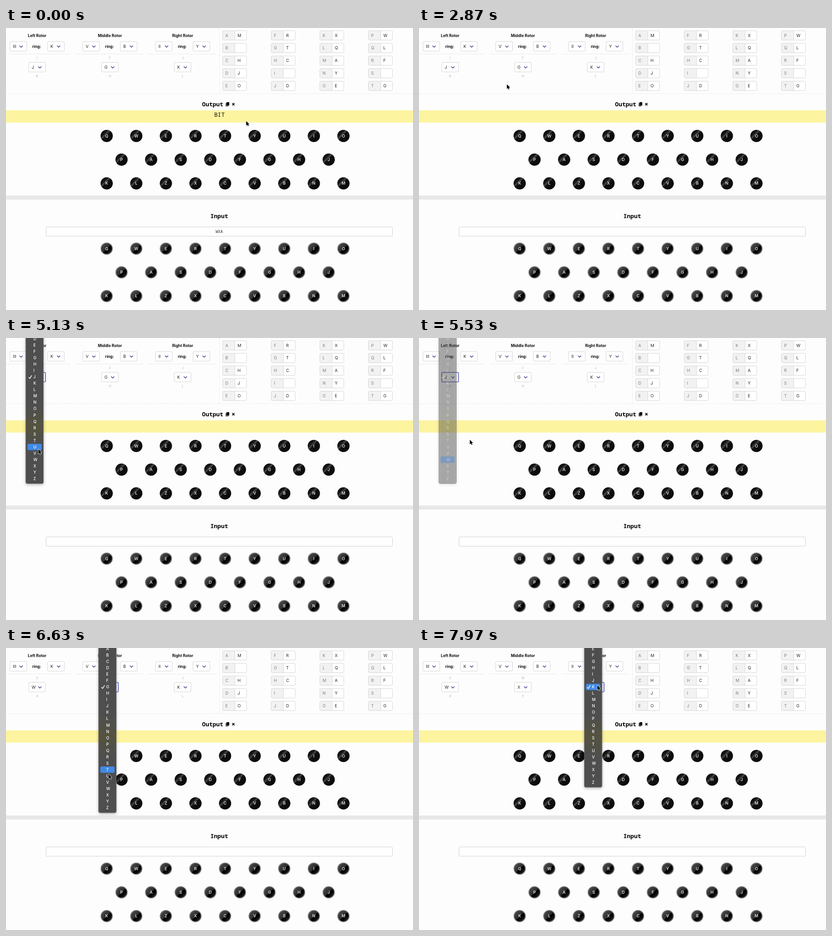
An HTML page with a canvas that plays this animation: 899x623 px, repeating every 8000 ms.

```html
<!DOCTYPE html>
<html>
<head>
<meta charset="utf-8">
<style>
html, body { margin: 0; width: 100%; height: 100%; overflow: hidden; background: #fdfdfd; }
canvas { display: block; }
</style>
</head>
<body>
<canvas id="stage" width="899" height="623"></canvas>
<script>
const ctx = document.getElementById('stage').getContext('2d');
const SANS = 'Inter, Roboto, sans-serif', MONO = '"Noto Sans Mono", "DejaVu Sans Mono", monospace';
const LOOP = 8000, STEP = 14.06, ROW_Y = 86;
const ABC = 'ABCDEFGHIJKLMNOPQRSTUVWXYZ';
const KEY_ROWS = ['QWERTYUIO', 'PASDFGHJ', 'KLZXCVBNM'];
const PLUGS = 'M HJORTC DXQAYEWLF G';

// set: moment the new letter shows; fade: start of the closing fade
const rotors = [
  { name: 'Left', x: 68.8, type: 'III', ring: 'K', from: 'J', to: 'W', focus: 3440, open: 3730, fade: 5410, set: 5610, blur: 6150 },
  { name: 'Middle', x: 229.6, type: 'V', ring: 'B', from: 'G', to: 'X', focus: 6150, open: 6170, fade: 7185, set: 7385, blur: 7850 },
  { name: 'Right', x: 390.2, type: 'II', ring: 'Y', from: 'K', to: 'K', focus: 7850, open: 7900, fade: 9000, set: 9200, blur: 9900 }
];

// time, x, y of the pointer tip
const path = [
  [0, 530.5, 205.5], [200, 530, 205], [430, 530, 205], [850, 514, 181], [1270, 503.5, 167],
  [1600, 503.5, 167], [1670, 502.5, 170], [2440, 502.5, 170], [2870, 194.5, 124.5], [3270, 90, 98],
  [3470, 77, 88], [4330, 77, 88], [4470, 74.5, 93], [4900, 73, 190], [5330, 71, 272], [5400, 72, 271],
  [5530, 112, 225], [6100, 236, 86], [6210, 235, 87], [6630, 226.5, 278.5], [7030, 225, 326],
  [7090, 227, 325], [7270, 298, 247.5], [7780, 394, 82.5], [8000, 394, 82.5]
];

function slope(i, k) {
  if (!i || i === path.length - 1) return 0;
  const [a, b, c] = [path[i - 1], path[i], path[i + 1]];
  const p = (b[k] - a[k]) / (b[0] - a[0]), q = (c[k] - b[k]) / (c[0] - b[0]);
  return p * q > 0 ? 2 * p * q / (p + q) : 0;
}

// Monotone cubic through the path points
function pointer(t, k) {
  let i = 0;
  while (i < path.length - 2 && path[i + 1][0] <= t) i++;
  const a = path[i], b = path[i + 1], d = b[0] - a[0], u = (t - a[0]) / d;
  const e = u * u * (3 - 2 * u);
  return a[k] + (b[k] - a[k]) * e + d * u * (1 - u) * (slope(i, k) * (1 - u) - slope(i + 1, k) * u);
}

function text(s, x, y, size, color, align = 'center', weight = 400, family = SANS) {
  ctx.font = `${weight} ${size}px ${family}`;
  ctx.textAlign = align;
  ctx.fillStyle = color;
  ctx.fillText(s, x, y + size * 0.36);
}

function box(x, y, w, h, r, fill, stroke, width = 1) {
  ctx.beginPath();
  ctx.roundRect(x, y, w, h, r);
  if (fill) { ctx.fillStyle = fill; ctx.fill(); }
  if (stroke) { ctx.strokeStyle = stroke; ctx.lineWidth = width; ctx.stroke(); }
}

function line(points, color, width, dash = []) {
  ctx.beginPath();
  points.forEach(p => ctx.lineTo(...p));
  ctx.setLineDash(dash);
  ctx.strokeStyle = color;
  ctx.lineWidth = width;
  ctx.stroke();
  ctx.setLineDash([]);
}

function select(x, y, label, focused) {
  box(x, y - 10.5, 37, 21, 2, '#fff', focused ? '#5560c0' : '#d4d4d4', focused ? 1.6 : 1);
  text(label, x + 6.5, y, 9, '#222', 'left');
  line([[x + 21, y - 1.5], [x + 24.5, y + 2], [x + 28, y - 1.5]], '#34348c', 1.3);
}

function rotor(r, t) {
  const letter = t < r.set ? r.from : r.to, i = ABC.indexOf(letter);
  text(r.name + ' Rotor', r.x, 16.5, 8.6, '#111', 'center', 700);
  select(r.x - 60, 40.5, r.type);
  text('ring:', r.x - 1, 40.5, 8.6, '#111', 'center', 700);
  select(r.x + 23, 40.5, r.ring);
  line([[r.x - 74, 57.5], [r.x + 74, 57.5]], '#ebebeb', 1);
  text(ABC[(i + 25) % 26], r.x, 66, 7, '#b5b5b5');
  select(r.x - 18.5, 86.5, letter, t >= r.focus && t < r.blur);
  text(ABC[(i + 1) % 26], r.x, 106, 7, '#b5b5b5');
}

function menu(r, t) {
  if (t < r.open || t >= r.set) return;
  const x = r.x - 25.3, first = ABC.indexOf(r.from);
  const rowY = i => ROW_Y + (i - first) * STEP;
  const top = rowY(0) - 11, height = rowY(25) + 11 - top;
  const hover = first + Math.round((pointer(Math.min(t, r.fade) - 40, 2) - ROW_Y) / STEP);
  const tint = ctx.createLinearGradient(0, 150, 0, 240);
  tint.addColorStop(0, '#4e4e4e');
  tint.addColorStop(0.5, '#55533f');
  tint.addColorStop(1, '#4e4e4e');

  ctx.save();
  ctx.globalAlpha = t < r.fade ? 1 : 1 - (t - r.fade) / (r.set - r.fade);
  ctx.shadowColor = 'rgba(0,0,0,.3)';
  ctx.shadowBlur = 6;
  ctx.shadowOffsetY = 2;
  box(x, top, 39.5, height, 4, tint);
  ctx.shadowColor = 'transparent';
  box(x + 0.5, top + 0.5, 38.5, height - 1, 4, null, '#666');
  box(x + 4, rowY(hover) - 7, 31.5, 14, 3, '#4189e6');
  [...ABC].forEach((c, i) => text(c, x + 17, rowY(i), 8.8, '#fff', 'left', 500));
  line([[x + 6.5, ROW_Y + 0.5], [x + 9, ROW_Y + 3.5], [x + 13.5, ROW_Y - 3.5]], '#fff', 1.4);
  ctx.restore();
}

function plugboard() {
  for (let i = 0; i < 20; i++) {
    const x = 478.5 + Math.floor(i / 5) * 107.35, y = 16.3 + i % 5 * 27.9;
    box(x, y - 10.3, 53, 20.6, 2, '#fff');
    box(x, y - 10.3, 27, 20.6, [2, 0, 0, 2], '#f2f2f2');
    box(x, y - 10.3, 53, 20.6, 2, null, '#d6d6d6');
    line([[x + 27, y - 10], [x + 27, y + 10]], '#d6d6d6', 1);
    text(ABC[i], x + 6, y, 9, '#7c7c7c', 'left');
    text(PLUGS[i], x + 33, y, 9, '#222', 'left');
  }
}

function key(c, x, y, rim) {
  const g = ctx.createLinearGradient(x - 9.5, y - 9.5, x + 9.5, y + 9.5);
  const stops = rim
    ? [[0, '#4a4a4a'], [0.5, '#2c2c2c'], [0.54, '#000'], [0.72, '#060606'], [1, '#303030']]
    : [[0, '#0c0c0c'], [0.22, '#161616'], [0.36, '#484848'], [0.46, '#101010'], [1, '#0a0a0a']];
  stops.forEach(s => g.addColorStop(...s));
  ctx.beginPath();
  ctx.arc(x, y, rim ? 12.6 : 13.5, 0, 7);
  ctx.fillStyle = g;
  ctx.fill();
  if (rim) { ctx.strokeStyle = '#808080'; ctx.lineWidth = 1.8; ctx.stroke(); }
  text(c, x, y, 9, '#dedede', 'center', 600);
}

function keyboard(y, rim) {
  KEY_ROWS.forEach((row, r) => [...row].forEach((c, i) =>
    key(c, (r === 1 ? 255.2 : 222.4) + i * 65.37, y + r * 52.4, rim)));
}

function icons() {
  box(487, 163.8, 6.2, 7.4, 1, '#111');
  line([[486, 165.8], [486, 172.3], [491.3, 172.3]], '#111', 1.3);
  line([[499.8, 165.9], [504.7, 170.8]], '#111', 1.8);
  line([[504.7, 165.9], [499.8, 170.8]], '#111', 1.8);
}

function arrow(x, y) {
  ctx.beginPath();
  [[0, 0], [0, 10.2], [2.3, 8.1], [3.9, 11.6], [5.6, 10.8], [4.1, 7.4], [7.2, 7.2]]
    .forEach(([dx, dy]) => ctx.lineTo(x + dx, y + dy));
  ctx.closePath();
  ctx.lineJoin = 'round';
  ctx.strokeStyle = '#fff';
  ctx.lineWidth = 1.3;
  ctx.stroke();
  ctx.fillStyle = '#000';
  ctx.fill();
}

function draw(now) {
  const t = now % LOOP, typed = t < 2000;
  ctx.fillStyle = '#fdfdfd';
  ctx.fillRect(0, 0, 899, 623);

  rotors.forEach(r => rotor(r, t));
  line([[471.5, 0], [471.5, 145]], '#e2e2e2', 1, [2, 2]);
  line([[0, 145], [899, 145]], '#e2e2e2', 1, [2, 2]);
  plugboard();

  text('Output', 456.5, 168, 13, '#000', 'center', 700, MONO);
  icons();
  box(0, 182, 899, 27, 0, '#fdf4a0');
  if (typed) text('BIT', 471.5, 191.3, 13, '#111', 'center', 400, MONO);
  keyboard(238.4, false);

  box(0, 370, 899, 9, 0, '#e8e8e8');
  text('Input', 471, 415.5, 13, '#000', 'center', 700, MONO);
  box(88.5, 439.5, 765, 20.5, 2, '#fff', '#cfcfcf');
  if (typed) text('WXA', 471, 450, 8.8, '#222', 'center', 400, MONO);
  keyboard(487.4, true);

  rotors.forEach(r => menu(r, t));
  arrow(pointer(t, 1), pointer(t, 2));
  requestAnimationFrame(draw);
}
requestAnimationFrame(draw);
</script>
</body>
</html>
```
